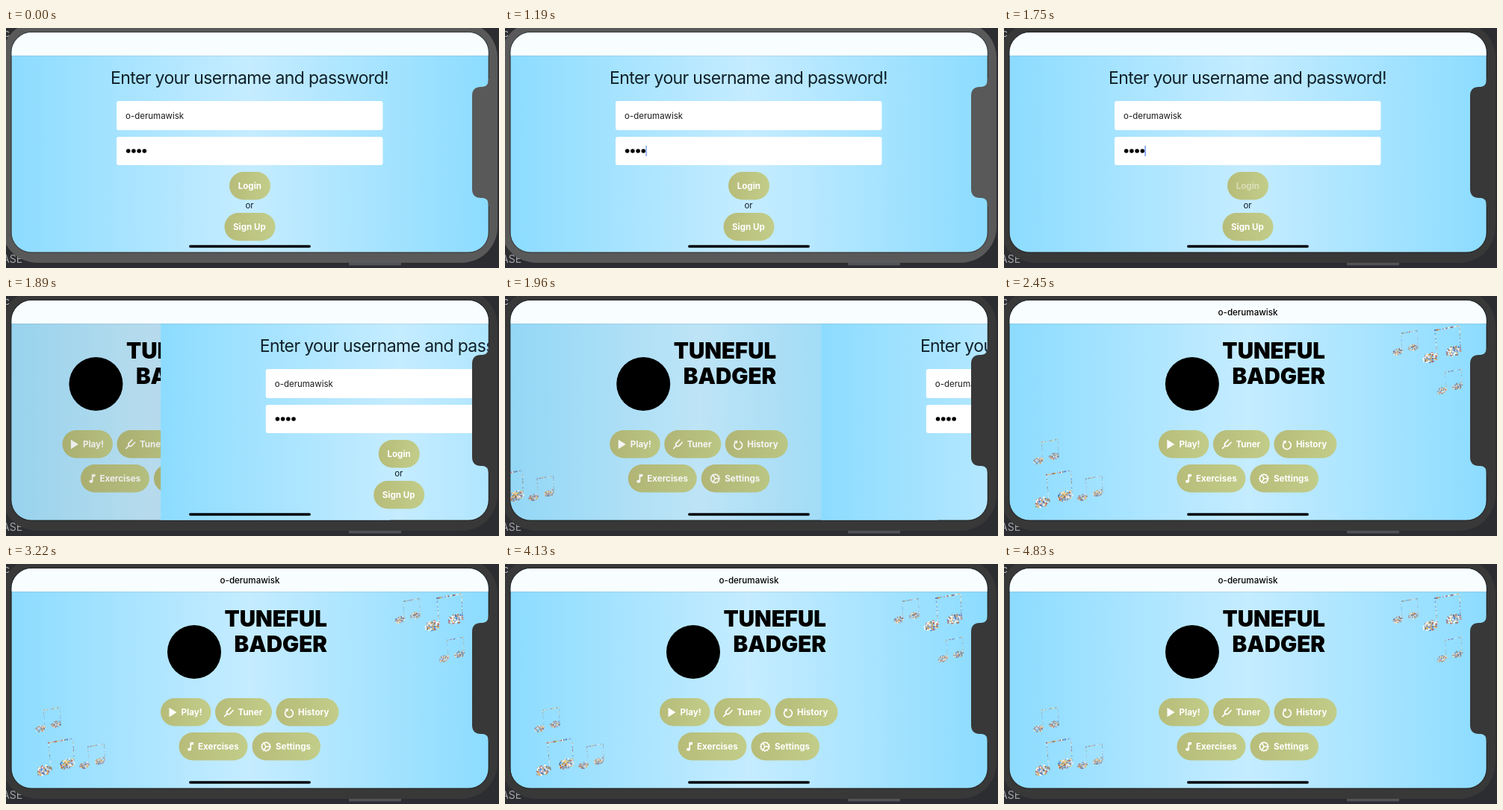
An HTML page with a canvas that plays this animation: 660x322 px, repeating every 4900 ms.

```html
<!DOCTYPE html>
<html lang="en">
<head>
<meta charset="utf-8">
<title>Login to home screen</title>
<style>
  html, body { margin: 0; width: 100%; height: 100%; overflow: hidden; background: #2b2d31; }
  canvas { display: block; }
</style>
</head>
<body>
<canvas id="stage" width="660" height="322"></canvas>
<script>
const ctx = document.getElementById('stage').getContext('2d');
const LOOP = 4900;
const STEP = 70;
const SCREEN = { x: 7.4, y: 6, w: 638.4, h: 294.8, r: 27 };
const USER = 'o-derumawisk';
const INK = '#10202b';
const SPECKS = ['#e6b04e', '#4668b4', '#b9bcc6', '#fbf6ec', '#c05a52', '#80705f', '#79a9dc', '#f2d27c', '#ffffff'];

const clamp = v => Math.min(1, Math.max(0, v));
const ramp = (t, from, to) => clamp((t - from) / (to - from));

// Critically damped spring from 0 to 1
function spring(ms) {
  const s = Math.max(0, ms) * 0.0156;
  return 1 - (1 + s) * Math.exp(-s);
}

function seeded(seed) {
  return () => (seed = (seed * 16807) % 2147483647) / 2147483647;
}

function box(x, y, w, h, r, fill) {
  ctx.fillStyle = fill;
  ctx.beginPath();
  ctx.roundRect(x, y, w, h, r);
  ctx.fill();
}

function disc(x, y, r, fill) {
  ctx.fillStyle = fill;
  ctx.beginPath();
  ctx.arc(x, y, r, 0, Math.PI * 2);
  ctx.fill();
}

function text(str, x, y, size, { weight = 400, fill = INK, align = 'left', spacing = 0 } = {}) {
  ctx.font = `${weight} ${size}px Inter, sans-serif`;
  ctx.letterSpacing = spacing + 'px';
  ctx.textAlign = align;
  ctx.fillStyle = fill;
  ctx.fillText(str, x, y);
  ctx.letterSpacing = '0px';
}

function across(x, w, ...colors) {
  const g = ctx.createLinearGradient(x, 0, x + w, 0);
  colors.forEach((c, i) => g.addColorStop(i / (colors.length - 1), c));
  return g;
}

function pageBackground() {
  ctx.fillStyle = across(SCREEN.x, SCREEN.w, '#8cdcff', '#c5ecff', '#8cdcff');
  ctx.fillRect(SCREEN.x, SCREEN.y, SCREEN.w, SCREEN.h);
}

function button(x, y, w, label, labelX, alpha = 1) {
  box(x, y, w, 37.5, 18.7, across(x, w, '#b7bc79', '#c2cd89'));
  text(label, labelX, y + 23, 11.6, { weight: 650, fill: `rgba(255,255,255,${alpha})` });
}

// Icons are drawn around their own centre in white
const icons = {
  play() { ctx.fill(new Path2D('M-4 -6.2 L6 0 L-4 6.2 Z')); },
  fork() { ctx.stroke(new Path2D('M-5.5 5.5 L-2 2 Q-3.5 -0.5 -1 -2.5 L2.5 -6 M-2 2 Q0.8 3.5 2.8 1 L6 -2.5')); },
  history() {
    ctx.stroke(new Path2D('M-3.4 -4 A5.4 5.4 0 1 0 2.4 -4.6'));
    ctx.fill(new Path2D('M-5.4 -5.6 L-0.8 -6 L-1.8 -1.6 Z'));
  },
  note() {
    ctx.fill(new Path2D('M-4 3.8 a2.5 2 0 1 0 5 0 a2.5 2 0 1 0 -5 0'));
    ctx.stroke(new Path2D('M0.2 3.8 V-5 L3.2 -5.2 V-3.4 L0.4 -3'));
  },
  gear() {
    ctx.lineWidth = 1.5;
    ctx.stroke(new Path2D('M-5.4 0 a5.4 5.4 0 1 0 10.8 0 a5.4 5.4 0 1 0 -10.8 0 M5 0 H0 L-2.7 -4.6 M0 0 L-2.7 4.6'));
    for (let i = 0; i < 12; i++) {
      const a = i * Math.PI / 6;
      ctx.fillRect(6.4 * Math.cos(a) - 0.6, 6.4 * Math.sin(a) - 0.6, 1.2, 1.2);
    }
  }
};

function icon(name, x, y) {
  ctx.save();
  ctx.translate(x, y);
  ctx.fillStyle = ctx.strokeStyle = '#fff';
  ctx.lineWidth = 1.7;
  ctx.lineCap = 'round';
  icons[name]();
  ctx.restore();
}

// Beamed pair of notes made of coloured specks
function confettiNotes(x, y, scale, seed) {
  const rnd = seeded(seed);
  const speck = (px, py, size) => {
    ctx.fillStyle = SPECKS[Math.floor(rnd() * SPECKS.length)];
    ctx.fillRect(px - size / 2, py - size / 2, size, size);
  };
  const line = (x1, y1, x2, y2, size) => {
    const steps = Math.hypot(x2 - x1, y2 - y1) / 1.7;
    for (let i = 0; i <= steps; i++) {
      const k = i / steps;
      if (rnd() < 0.8) speck(x1 + (x2 - x1) * k, y1 + (y2 - y1) * k, size);
    }
  };
  ctx.save();
  ctx.translate(x, y);
  ctx.scale(scale, scale);
  ctx.globalAlpha = scale < 1 ? 0.8 : 0.95;
  for (const [hx, hy] of [[11, 45], [42, 36]]) {
    for (let i = 0; i < 110; i++) {
      const a = rnd() * Math.PI * 2, r = Math.sqrt(rnd());
      speck(hx + 10 * r * Math.cos(a), hy + 6.5 * r * Math.sin(a) - 2 * r * Math.cos(a), 1.9);
    }
  }
  line(20, 43, 17, 8, 1.1);
  line(51, 34, 50, 2, 1.1);
  line(17, 8, 50, 2, 1.8);
  ctx.restore();
}

function homePage() {
  pageBackground();
  confettiNotes(520, 45, 0.67, 11);
  confettiNotes(560, 38, 1, 23);
  confettiNotes(579, 97, 0.67, 37);
  confettiNotes(39, 191, 0.67, 41);
  confettiNotes(40, 232, 1, 59);
  confettiNotes(98, 240, 0.67, 67);

  disc(252, 118, 36, '#000');
  const title = { weight: 900, fill: '#000', align: 'right' };
  text('TUNEFUL', 430, 84, 29.5, title);
  text('BADGER', 430, 117.5, 29.5, title);

  button(207, 180, 67.5, 'Play!', 234.5);
  button(280, 180, 76, 'Tuner', 310.5);
  button(361.5, 180, 84, 'History', 391);
  button(231.5, 226, 92, 'Exercises', 257);
  button(329.5, 226, 91.5, 'Settings', 361);
  icon('play', 222.5, 199);
  icon('fork', 298, 199);
  icon('history', 379, 200);
  icon('note', 247, 245);
  icon('gear', 348, 245);
}

function cursorAlpha(t) {
  const phase = t % 1000;
  return ramp(phase, 60, 210) * (1 - ramp(phase, 760, 910));
}

function loginPage(t) {
  pageBackground();
  text('Enter your username and password!', 326, 75, 23, { align: 'center', spacing: -0.63 });
  box(148, 98, 356.5, 39, 3, '#fff');
  box(148, 146, 356.5, 38, 3, '#fff');
  text(USER, 160, 121.5, 11.5, { fill: '#1a1a1a' });
  for (let i = 0; i < 4; i++) disc(163.7 + i * 7.2, 165, 2.8, '#000');
  if (t < 1820) {
    ctx.fillStyle = `rgba(66,120,235,${cursorAlpha(t)})`;
    ctx.fillRect(188.5, 158, 1.2, 14);
  }
  const pressed = t >= 1680 && t < 1820;
  button(299, 193, 55, 'Login', 310.7, pressed ? 0.45 : 1);
  text('or', 326, 242, 11.5, { align: 'center' });
  button(292.5, 248, 68, 'Sign Up', 304);
}

function shifted(dx, paint) {
  ctx.save();
  ctx.translate(dx, 0);
  paint();
  ctx.restore();
}

const notch = new Path2D('M646 68 Q646 79 638 79 H636 Q624 79 624 91 V216 Q624 228 636 228 H638 Q646 228 646 239 H648 V68 Z');

function draw(t) {
  const slide = spring(t - 1817.4);
  const shade = Math.round(89 - 33 * ramp(t, 1190, 1540));
  const bezel = `rgb(${shade},${shade},${shade})`;

  ctx.fillStyle = '#2b2d31';
  ctx.fillRect(0, 0, 660, 322);
  text('c', -3, 12, 14, { fill: '#b5b6b9' });
  text('ASE', -5, 315, 14, { fill: '#a4a5a8' });
  box(459, 314, 70, 4.5, 1, '#505257');
  box(-6, -8, 664, 323, 48, bezel);

  ctx.save();
  ctx.beginPath();
  ctx.roundRect(SCREEN.x, SCREEN.y, SCREEN.w, SCREEN.h, SCREEN.r);
  ctx.strokeStyle = 'rgba(0,0,0,.4)';
  ctx.lineWidth = 2;
  ctx.stroke();
  ctx.clip();
  if (slide > 0) {
    shifted(-0.3 * SCREEN.w * (1 - slide), homePage);
    ctx.fillStyle = `rgba(0,0,0,${0.1 * (1 - slide)})`;
    ctx.fillRect(SCREEN.x, SCREEN.y, SCREEN.w, SCREEN.h);
  }
  if (slide < 0.999) shifted(SCREEN.w * slide, () => loginPage(t));

  ctx.fillStyle = '#f8feff';
  ctx.fillRect(SCREEN.x, SCREEN.y, SCREEN.w, 31);
  ctx.fillStyle = 'rgba(60,110,130,.22)';
  ctx.fillRect(SCREEN.x, 37, SCREEN.w, 0.7);
  if (t >= 2380) text(USER, 326.5, 25.7, 11.6, { weight: 550, fill: '#000', align: 'center' });
  box(245, 291.2, 163, 3.5, 1.75, '#05080c');
  ctx.restore();

  ctx.fillStyle = bezel;
  ctx.fill(notch);
}

function frame(now) {
  draw(Math.floor((now % LOOP) / STEP) * STEP);
  requestAnimationFrame(frame);
}
requestAnimationFrame(frame);
</script>
</body>
</html>
```
